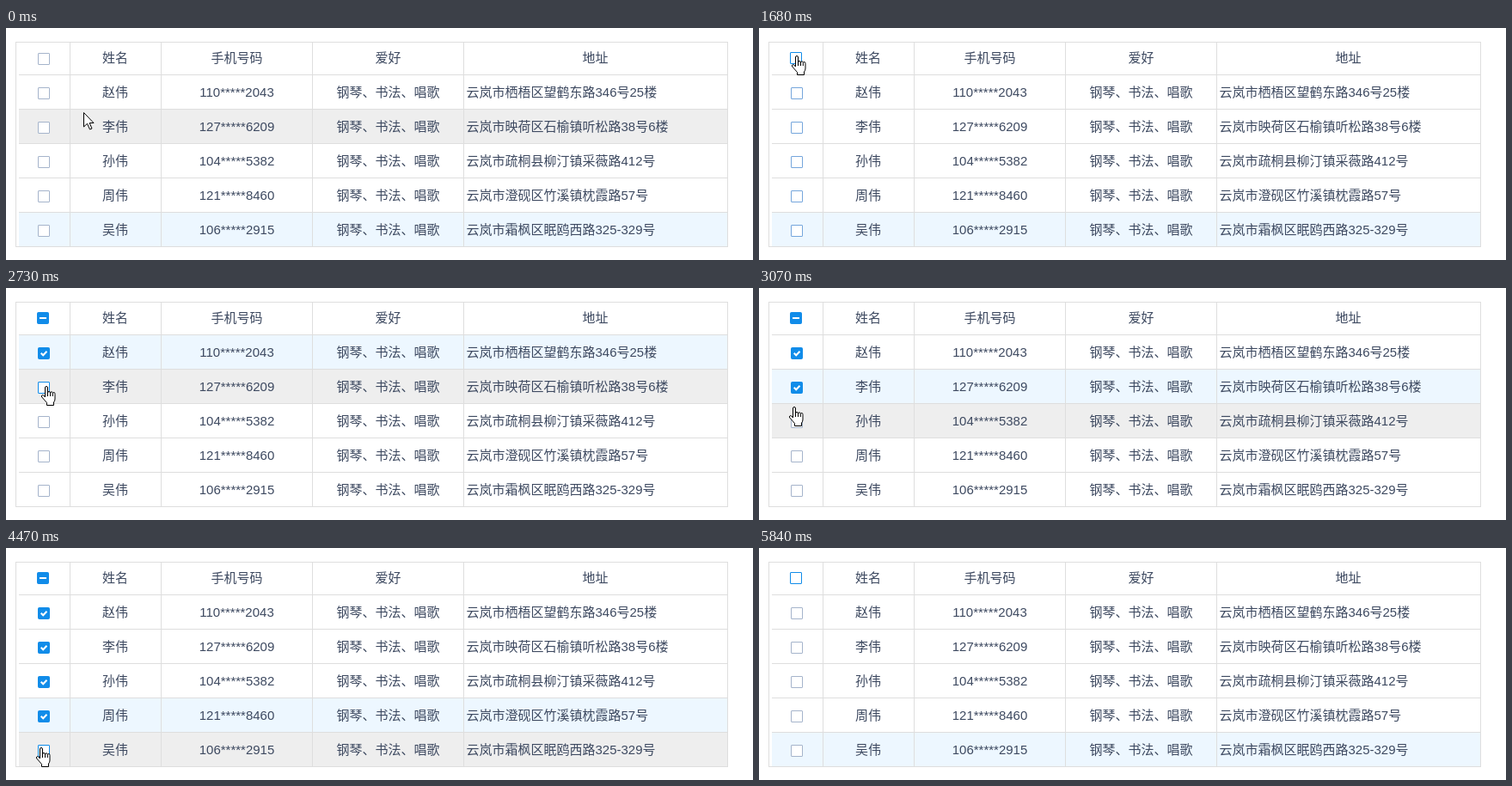
Write an HTML page with a canvas that moves like this. It is 869 px wide and 270 px high and loops after 7.19 s.

```html
<!DOCTYPE html>
<html lang="zh-CN">
<head>
<meta charset="utf-8">
<style>
  html, body { margin: 0; width: 100%; height: 100%; overflow: hidden; background: #fff; }
  canvas { display: block; }
</style>
</head>
<body>
<canvas id="stage" width="869" height="270"></canvas>
<script>
const ctx = document.getElementById('stage').getContext('2d');
const LOOP = 7190;
const BLUE = '#118ce9', LINE = '#dedede', BOX = '#a5b4cb', FADING = '#75a6dc';
const FONT = '300 15px "Liberation Sans", "Noto Sans CJK SC", "Noto Sans CJK", sans-serif';

const people = [
  ['赵伟', '110*****2043', '云岚市栖梧区望鹤东路346号25楼'],
  ['李伟', '127*****6209', '云岚市映荷区石榆镇听松路38号6楼'],
  ['孙伟', '104*****5382', '云岚市疏桐县柳汀镇采薇路412号'],
  ['周伟', '121*****8460', '云岚市澄砚区竹溪镇枕霞路57号'],
  ['吴伟', '106*****2915', '云岚市霜枫区眠鸥西路325-329号'],
];

// at: start in ms; hover, current: row 1-5; checked: ticked rows from the top;
// hot: row whose box is under the pointer (0 is the header)
const steps = [
  { at: 0, cursor: 'arrow', x: 90, y: 98, hover: 2, current: 5, checked: 0 },
  { at: 330, cursor: 'arrow', x: 50, y: 29, current: 5, checked: 0 },
  { at: 660, cursor: 'hand', x: 40, y: 32, current: 5, checked: 0, hot: 0 },
  { at: 1030, cursor: 'arrow', x: 40, y: 51, hover: 1, current: 5, checked: 5 },
  { at: 1350, cursor: 'hand', x: 38, y: 32, current: 5, checked: 5, hot: 0 },
  { at: 1680, cursor: 'hand', x: 38, y: 32, current: 5, checked: 0, hot: 0, fading: true },
  { at: 2040, cursor: 'hand', x: 34, y: 71, hover: 1, current: 5, checked: 0, hot: 1 },
  { at: 2370, cursor: 'hand', x: 34, y: 71, current: 1, checked: 1, hot: 1 },
  { at: 2730, cursor: 'hand', x: 41, y: 114, hover: 2, current: 1, checked: 1, hot: 2 },
  { at: 3070, cursor: 'hand', x: 35, y: 138, hover: 3, current: 2, checked: 2 },
  { at: 3430, cursor: 'hand', x: 34, y: 154, hover: 3, current: 2, checked: 2, hot: 3 },
  { at: 3750, cursor: 'hand', x: 38, y: 193, hover: 4, current: 3, checked: 3, hot: 4 },
  { at: 4100, cursor: 'hand', x: 37, y: 213, current: 4, checked: 4 },
  { at: 4470, cursor: 'hand', x: 35, y: 232, hover: 5, current: 4, checked: 4, hot: 5 },
  { at: 4790, cursor: 'hand', x: 37, y: 188, hover: 4, current: 5, checked: 5 },
  { at: 5150, cursor: 'hand', x: 35, y: 32, current: 5, checked: 5, hot: 0 },
  { at: 5470, cursor: 'hand', x: 39, y: 33, current: 5, checked: 0, hot: 0, fading: true },
  { at: 5840, current: 5, checked: 0 },
];

const cursors = {
  arrow: new Path2D('M.5 .5V17L4.5 13.3L7.5 20L10 19L7.2 12.5H12Z'),
  hand: new Path2D('M4.5 13V2a1.5 1.5 0 0 1 3 0V8a1.5 1.5 0 0 1 3 0a1.4 1.4 0 0 1 2.8 .6' +
    'a1.3 1.3 0 0 1 2.7 .9V15q0 2.5-1.5 4v3.5h-8v-3L.8 13a1.4 1.4 0 0 1 2-2Z'),
};
const knuckles = new Path2D('M7.5 8v4M10.5 8v4M13.3 9v3');
const tick = new Path2D('M3.7 6.8L6.2 9.3L10.5 4.7');

function rect(x, y, w, h, color) {
  ctx.fillStyle = color;
  ctx.fillRect(x, y, w, h);
}

function label(text, x, y, align = 'center') {
  ctx.textAlign = align;
  ctx.fillStyle = '#3d4960';
  ctx.fillText(text, x, y);
}

function checkbox(x, y, mark, border) {
  ctx.save();
  ctx.translate(x, y);
  ctx.beginPath();
  ctx.roundRect(0.5, 0.5, 13, 13, mark ? 1 : 0.5);
  ctx.fillStyle = mark ? BLUE : '#fff';
  ctx.strokeStyle = mark ? BLUE : border;
  ctx.lineWidth = 1;
  ctx.fill();
  ctx.stroke();
  if (mark === 'dash') rect(3, 6, 8, 2, '#fff');
  if (mark === 'tick') {
    ctx.strokeStyle = '#fff';
    ctx.lineWidth = 2;
    ctx.stroke(tick);
  }
  ctx.restore();
}

function drawCursor({ cursor, x, y }) {
  if (!cursor) return;
  ctx.save();
  ctx.translate(x, y);
  ctx.fillStyle = '#fff';
  ctx.strokeStyle = '#000';
  ctx.lineWidth = 1;
  ctx.fill(cursors[cursor]);
  ctx.stroke(cursors[cursor]);
  if (cursor === 'hand') ctx.stroke(knuckles);
  ctx.restore();
}

function drawGrid() {
  rect(11, 16, 829, 1, LINE);
  rect(11, 16, 1, 239, LINE);
  for (let y = 54; y < 254; y += 40) rect(15, y, 824, 1, LINE);
  rect(11, 254, 829, 1, LINE);
  for (const x of [74, 180, 356, 532, 839]) rect(x, 16, 1, 239, LINE);
}

function draw(time) {
  const step = steps.findLast(s => s.at <= time);
  const { hover, current, checked, hot, fading } = step;
  ctx.font = FONT;
  rect(0, 0, 869, 270, '#fff');
  people.forEach((_, i) => {
    const row = i + 1;
    const color = row === hover ? '#eee' : row === current ? '#edf7ff' : '#fff';
    rect(15, 15 + row * 40, 824, 39, color);
  });
  drawGrid();

  // The header box keeps its focus look once clicked
  const focused = time >= 1680;
  const headMark = checked === 5 ? 'tick' : checked ? 'dash' : '';
  checkbox(focused ? 36 : 37, focused ? 28 : 29, headMark, focused || hot === 0 ? BLUE : BOX);
  label('姓名', 127, 40);
  label('手机号码', 268.5, 40);
  label('爱好', 444.5, 40);
  label('地址', 685.5, 40);

  people.forEach(([name, phone, address], i) => {
    const row = i + 1, top = row * 40;
    const border = hot === row ? BLUE : fading ? FADING : BOX;
    checkbox(37, top + 29, row <= checked ? 'tick' : '', border);
    label(name, 127, top + 40);
    label(phone, 268.5, top + 40);
    label('钢琴、书法、唱歌', 444.5, top + 40);
    label(address, 535.5, top + 40, 'left');
  });
  drawCursor(step);
}

const start = performance.now();
function tickFrame() {
  draw((performance.now() - start) % LOOP);
  requestAnimationFrame(tickFrame);
}
tickFrame();
</script>
</body>
</html>
```
